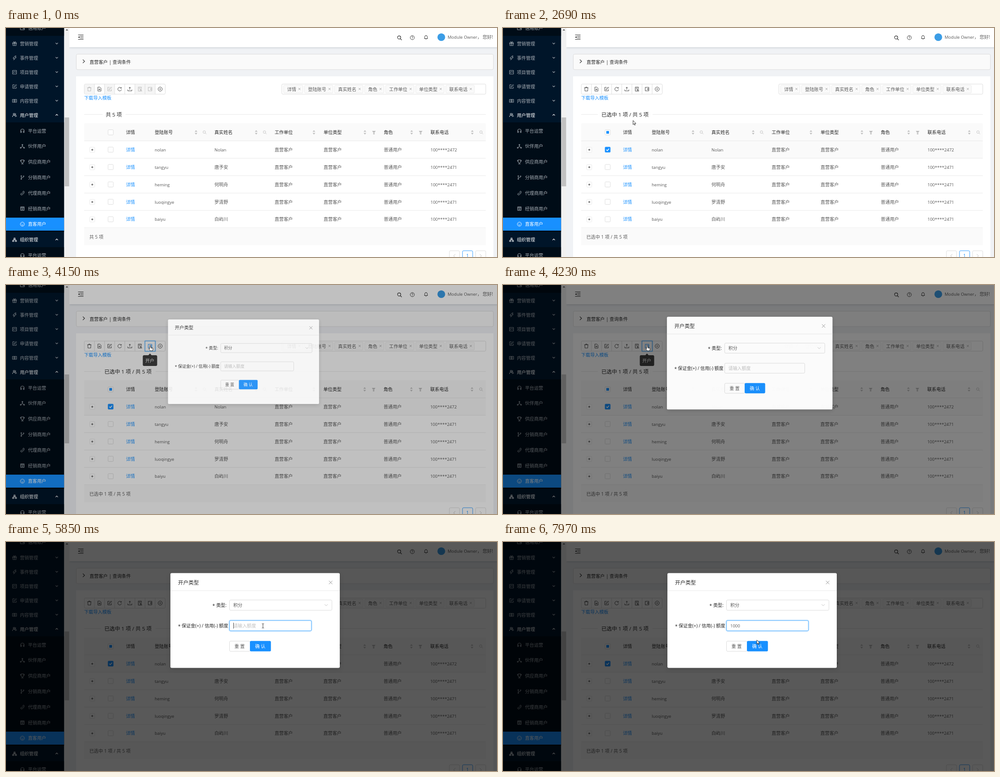
These frames come from a looping animation (1093 px wide and 512 px high, 8000 ms). An HTML page:

```html
<!DOCTYPE html>
<html lang="zh-CN">
<head>
<meta charset="utf-8">
<title>开户</title>
<style>
html, body { margin: 0; width: 100%; height: 100%; overflow: hidden; background: #f0f2f5; }
svg { display: block; width: 100vw; height: 100vh; }
text { font: 10.15px "Open Sans", "Noto Sans CJK SC", "Noto Sans CJK JP", sans-serif; white-space: pre; }
text.latin { font-size: 9.5px; }
text.big { font-size: 11.6px; }
.top { filter: drop-shadow(0 1px 2px rgba(0, 21, 41, .18)); }
.pop { filter: drop-shadow(0 3px 5px rgba(0, 0, 0, .15)); }
</style>
</head>
<body>
<svg id="stage" viewBox="0 0 1093 512"></svg>
<script>
const LOOP = 8000, BLUE = '#1890ff', TEXT = '#595959', HEAD = '#262626', LINE = '#e8e8e8', EDGE = '#d9d9d9';
const ring = (x, y, r) => `M${x - r} ${y}a${r} ${r} 0 1 0 ${2 * r} 0a${r} ${r} 0 1 0 ${-2 * r} 0`;
const icons = {
  card: 'M-4.5-3.5h9v7h-9zM4.5-1h-3v2h3',
  gift: 'M-4.5-2h9v2h-9zM-3.7 0v4.3h7.4V0M0-2v6M0-2c-3 0-3-3-1.5-2.5S0-2 0-2s.5-3 2-2.5S3-2 0-2',
  bolt: 'M1-4.5L-3.5.7h3L-2 4.5 4-1.3H1L3.5-4.5z',
  board: 'M-4.5-4h9v8h-9zM-2.2-2v4M0-2v2M2.2-2v3',
  edit: 'M0-4h-4v8h8V.5M-1.5 1.5l.3-1.8 4.7-4.2 1.2 1.2L.3 1.2z',
  read: 'M0-3.2h-4.7v6.5H0zM0-3.2h4.7v6.5H0zM-3.2-1h1.7M-3.2 1h1.7M1.5-1h1.7M1.5 1h1.7',
  team: ring(-1.2, -2.2, 1.8) + 'M-4.5 4c0-5.2 6.5-5.2 6.5 0M1.5-4a1.9 1.9 0 0 1 0 3.5c2 .6 2.6 2 2.9 3.8',
  headset: 'M-4 1V0a4 4 0 0 1 8 0v1M-4 .5h2V4h-2zM2 .5h2V4h-2z',
  nodes: 'M-1-4.3h2v2h-2zM-4.7 2.2h2v2h-2zM2.7 2.2h2v2h-2zM0-2.3V.5l-3 1.7M0 .5l3 1.7',
  cup: 'M-2.8-4.5h5.6v4a2.8 2.8 0 0 1-5.6 0zM-2.8-3.5h-1.7V-2l1.7 1.5M2.8-3.5h1.7V-2L2.8-.5M0 2.5v2M-2.5 4.5h5',
  branch: ring(-2.5, -3.3, 1) + ring(-2.5, 3.5, 1) + ring(2.7, -2.7, 1) + 'M-2.5-2.3v4.8M2.7-1.7c0 2.5-4.2 1-5.2 3.6',
  phone: 'M-4 2l2-1.8L-.7 1.3 2-1.4.7-2.7 2.3-4.5l2 1.6C4 .8.2 4.6-2.8 4.3z',
  shop: 'M-4-4h8v8h-8zM-4-1.3h8M-1.4-4v2.7M1.4-4v2.7M-1.5 4V1.2h3V4',
  smile: ring(0, 0, 4.6) + 'M-1.8-1.5v1M1.8-1.5v1M-2 1.2q2 2.4 4 0',
  org: 'M-1.5-4h3v2.5h-3zM-4.5 1.5h3V4h-3zM1.5 1.5h3V4h-3zM0-1.5V0M-3 1.5V0h6v1.5',
  bin: 'M-4.5-3h9M-1.5-3v-1.5h3V-3M-3.5-3l.4 7.3h6.2L3.5-3',
  fileAdd: 'M-3.5-4.5H1L3.5-2v6.5h-7zM0-1.2v4M-2 .8h4',
  reload: 'M3.4-2.2a4.1 4.1 0 1 0 .6 3M3.8-4.2v2.3H1.5',
  upload: 'M0 1.5v-6M-2-2.5l2-2 2 2M-4.5 1v3h9V1',
  audit: 'M3.3-1v-3.5h-7v9H-.5M-2-2.5h3.5M-2-.3H0' + ring(2, 1, 1.2) + 'M-.3 4.5c.3-2.6 4.3-2.6 4.6 0z',
  account: 'M-4-4h8v8h-8zM4-1.2H1v2.4h3',
  cancel: ring(0, 0, 4.6) + 'M-1.6-1.6l3.2 3.2M1.6-1.6l-3.2 3.2',
  search: ring(-.8, -.8, 3.5) + 'M1.8 1.8L5 5',
  help: ring(0, 0, 4.6) + 'M-1.4-1.2c0-2 2.9-1.8 2.8 0C1.4 0 0 0 0 1.2M0 2v.8',
  bell: 'M-4 3h8M-3 3v-3.5a3 3 0 0 1 6 0V3M0-3.5v-1M-1 4.5h2',
  fold: 'M-6-5H6M-1.5-1.7H6M-1.5 1.7H6M-6 5H6',
  down: 'M-2.6-1.3L0 1.3l2.6-2.6', up: 'M-2.6 1.3L0-1.3l2.6 2.6',
  next: 'M-2-3.8L2 0l-4 3.8', prev: 'M2-3.8L-2 0l4 3.8',
  cross: 'M-2.2-2.2l4.4 4.4M2.2-2.2l-4.4 4.4', plus: 'M-2.3 0h4.6M0-2.3v4.6'
};

function add(parent, tag, attrs = {}, content) {
  const node = document.createElementNS('http://www.w3.org/2000/svg', tag);
  set(node, attrs);
  if (content) node.textContent = content;
  return parent.appendChild(node);
}
function set(node, attrs) { for (const k in attrs) node.setAttribute(k, attrs[k]); }
const group = (p, a) => add(p, 'g', a);
const rect = (p, x, y, w, h, fill, a) => add(p, 'rect', { x, y, width: w, height: h, fill, ...a });
const box = (p, x, y, w, h, fill = '#fff', stroke = EDGE, rx = 2.5) => rect(p, x, y, w, h, fill, { stroke, rx, 'stroke-width': .9 });
const label = (p, x, cy, str, fill = TEXT, cls = '') => add(p, 'text', { x, y: cy + (cls == 'big' ? 4.3 : 3.8), fill, class: cls }, str);
const rule = (p, x1, x2, y, stroke = LINE) => add(p, 'line', { x1, x2, y1: y, y2: y, stroke });
const icon = (p, name, x, y, stroke = TEXT, a) => add(p, 'path',
  { d: icons[name], transform: `translate(${x} ${y})`, fill: 'none', stroke, 'stroke-width': .95, ...a });

const stage = document.getElementById('stage');
const page = group(stage);
rect(page, 0, 0, 1093, 512, '#f0f2f5');

// Header
rect(page, 141, -10, 960, 53, '#fff', { class: 'top' });
icon(page, 'fold', 166.5, 20.5, HEAD, { 'stroke-width': 1.1 });
add(page, 'path', { d: 'M160.5 20.5l3.3-2.3v4.6z', fill: HEAD });
icon(page, 'search', 876, 22, '#333', { 'stroke-width': 1.2 });
icon(page, 'help', 904.5, 21.5, '#333');
icon(page, 'bell', 935, 20.5, '#333');
add(page, 'circle', { cx: 969, cy: 20.5, r: 8.6, fill: '#3b9de6' });
label(page, 983, 20.5, 'Module Owner', TEXT, 'latin');
label(page, 1049, 20.5, '，');
label(page, 1061, 20.5, '您好!');

// Side menu
rect(page, 0, 0, 129.5, 512, '#001529');
for (const [y, h] of [[0, 17.5], [211, 245], [490, 22]]) rect(page, 0, y, 129.5, h, '#000c17');
rect(page, 0, 424, 129.5, 29, BLUE);
const DIM = '#a6adb4';
function menuItem(name, str, y, color = DIM, arrow) {
  const sub = !arrow;
  icon(page, name, sub ? 36.5 : 19, y, color);
  label(page, sub ? 49 : 31, y, str, color);
  if (arrow) icon(page, arrow, 113, y - .5, color, { 'stroke-width': 1.2 });
}
menuItem('card', '信用账户', .5);
[['gift', '营销管理'], ['bolt', '事件管理'], ['board', '项目管理'], ['edit', '申请管理'], ['read', '内容管理']]
  .forEach(([name, str], i) => menuItem(name, str, 35 + i * 31.95, DIM, 'down'));
menuItem('team', '用户管理', 194.8, '#fff', 'up');
[['headset', '平台运营'], ['nodes', '伙伴用户'], ['cup', '供应商用户'], ['branch', '分销商用户'],
  ['phone', '代理商用户'], ['shop', '经销商用户'], ['smile', '直客用户']]
  .forEach(([name, str], i) => menuItem(name, str, 229.8 + i * 34.8, i == 6 ? '#fff' : DIM));
menuItem('org', '组织管理', 473.5, '#fff', 'up');
menuItem('headset', '平台运营', 508.3);
rect(page, 129.5, 0, 11.5, 512, '#f1f1f1');
rect(page, 130.5, 200, 10, 154, '#c1c1c1');
add(page, 'path', { d: 'M132.8 5.5h5.6l-2.8-3z', fill: '#505050' });

// Query panel and card
box(page, 156.5, 58.5, 928.5, 34.5, '#fafafa', EDGE, 3);
icon(page, 'next', 173, 74.5, HEAD, { 'stroke-width': 1.1 });
label(page, 186, 76, '直营客户 | 查询条件', HEAD);
rect(page, 156, 108, 929, 404, '#fff');

// Toolbar
box(page, 174.3, 125.3, 180.2, 22.7);
const tools = ['bin', 'fileAdd', 'edit', 'reload', 'upload', 'audit', 'account', 'cancel'].map((name, i) => {
  const x = 174.3 + i * 22.53, locked = [0, 2, 5, 6].includes(i);
  const shade = locked && rect(page, x + .5, 125.8, 21.6, 21.7, '#f5f5f5');
  if (i) add(page, 'line', { x1: x, x2: x, y1: 125.3, y2: 148, stroke: EDGE, 'stroke-width': .9 });
  return { shade, pic: icon(page, name, x + 11.2, 136.6, '#000', { 'stroke-opacity': .75 }) };
});
const halo = rect(page, 308.8, 124.6, 24.2, 24.1, 'none', { stroke: BLUE, 'stroke-opacity': .2, 'stroke-width': 2.5, rx: 2 });
const hot = rect(page, 309.5, 125.3, 22.8, 22.7, 'none', { stroke: '#40a9ff' });
label(page, 174, 156, '下载导入模板', BLUE);

// Column tags
box(page, 614, 125.3, 454, 22.7);
[[618, '详情'], [664.5, '登陆账号'], [731.5, '真实姓名'], [798.5, '角色'], [845, '工作单位'], [912, '单位类型'], [979, '联系电话']]
  .forEach(([x, str]) => {
    const w = str.length > 2 ? 63.5 : 43;
    box(page, x, 128, w, 17.3, '#fafafa', LINE, 1.5);
    label(page, x + 7.8, 136.7, str);
    icon(page, 'cross', x + w - 7.8, 136.3, '#8c8c8c', { 'stroke-width': .8 });
  });

// Divider with the selection count
const ruleL = rule(page, 174, 215, 193.3), ruleR = rule(page, 266, 1068, 193.3);
const count = label(page, 222, 193.5, '共 5 项', HEAD, 'big');

// Table
const rowY = i => 272 + i * 38.9;
const rowFill = [0, 1, 2, 3, 4].map(i => rect(page, 174, rowY(i) - 19.5, 894, 38.9, '#fff'));
rect(page, 174, 213, 894, 39, '#fafafa', { rx: 2 });
for (let i = -1; i < 5; i++) rule(page, 174, 1068, rowY(i) + 19.2);
rect(page, 174, 447, 894, 38.5, '#fafafa');
const foot = label(page, 185.5, 467, '共 5 项');

const fixed = group(page), late = group(page);
const people = [['nolan', 'Nolan'], ['tangyu', '唐予安'], ['heming', '何明舟'], ['luoqingye', '罗清野'], ['baiyu', '白屿川']];
const columns = [
  [267, '详情', () => '详情'],
  [331, '登陆账号', i => people[i][0], 423, 'search', 442],
  [464, '真实姓名', i => people[i][1], 557, 'search', 576],
  [598, '工作单位', () => '直营客户', 685.5],
  [707, '单位类型', () => '直营客户', 799, 'filter', 819],
  [841, '角色', () => '普通用户', 903, 'filter', 923],
  [945, '联系电话', i => '100****' + (i ? 2471 : 2472), 1038, 'search', 1058]
];
columns.forEach(([x, title, cell, sortX, extra, extraX], c) => {
  const g = c > 3 ? late : fixed;
  label(g, x, 233.3, title, HEAD);
  if (sortX) add(g, 'path', { d: `M${sortX - 3} 232h6l-3-3.6zM${sortX - 3} 234.6h6l-3 3.6z`, fill: '#bfbfbf' });
  if (extra == 'search') icon(g, 'search', extraX, 233.3, '#b0b0b0', { transform: `translate(${extraX} 233.3) scale(.8)` });
  if (extra == 'filter') add(g, 'path', { d: `M${extraX - 4} 230h8l-2.6 4h-2.8zM${extraX - 1.6} 234.8h3.2v3h-3.2z`, fill: '#bfbfbf' });
  for (let i = 0; i < 5; i++) {
    const str = cell(i);
    label(g, x, rowY(i), str, c ? TEXT : BLUE, /^[\w*]+$/.test(str) ? 'latin' : '');
  }
});
const checkbox = y => box(page, 227.2, y - 5.8, 11.6, 11.6, '#fff', EDGE, 1.5);
checkbox(233.3);
const partial = rect(page, 230, 230.3, 6, 6, BLUE);
let firstCheck;
for (let i = 0; i < 5; i++) {
  const y = rowY(i), c = checkbox(y);
  if (!i) firstCheck = c;
  box(page, 186.4, y - 5.5, 11.2, 11.6, '#fff', LINE, 1.5);
  icon(page, 'plus', 192, y + .3, HEAD, { 'stroke-width': .9 });
}
const tick = add(page, 'path', { d: 'M230 272l2.2 2.3 3.9-4.5', fill: 'none', stroke: '#fff', 'stroke-width': 1.5 });

// Pagination
[987, 1016.2, 1045.3].forEach((x, i) => box(page, x, 498, 22.7, 22.7, '#fff', i == 1 ? BLUE : EDGE));
icon(page, 'prev', 998.3, 509.5, '#bfbfbf');
label(page, 1024.6, 509, '1', BLUE);
icon(page, 'next', 1056.6, 509.5, '#bfbfbf');

// Tooltip
const tip = group(stage);
add(tip, 'path', { d: 'M307.5 157h9.5l3.5-4 3.5 4h9.5q3 0 3 3v18q0 3-3 3h-26q-3 0-3-3v-18q0-3 3-3z', fill: '#000', 'fill-opacity': .75 });
label(tip, 310, 169, '开户', '#fff');

// Dialog
const mask = rect(stage, 0, 0, 1093, 512, '#000');
const modal = group(stage);
rect(modal, 366, 69.5, 377, 212, '#fff', { rx: 3, class: 'pop' });
label(modal, 383, 90.3, '开户类型', HEAD, 'big');
icon(modal, 'cross', 722.7, 90.5, '#8c8c8c', { d: 'M-3.8-3.8l7.6 7.6M3.8-3.8l-7.6 7.6' });
rule(modal, 366, 743, 108.8);
label(modal, 459.5, 142, '*', HEAD);
label(modal, 468, 141.3, '类型:', HEAD);
box(modal, 497.5, 129.7, 228, 23);
label(modal, 506, 141.3, '积分');
icon(modal, 'down', 712.7, 141, '#bfbfbf', { d: 'M-3.4-1.8L0 1.8l3.4-3.6' });
label(modal, 383, 188, '*', HEAD);
label(modal, 391, 187.3, '保证金(+) / 信用(-) 额度', HEAD);
const glow = rect(modal, 496.6, 174.8, 184, 24.6, 'none', { stroke: BLUE, 'stroke-width': 2, rx: 3.5 });
const input = box(modal, 497.5, 175.7, 182.3, 22.8);
const hint = label(modal, 506, 187.3, '请输入额度', '#bfbfbf');
const typed = label(modal, 506, 187.3, '', TEXT, 'latin');
const caret = rect(modal, 506, 180.5, .9, 13, '#333');
box(modal, 497.5, 221.6, 46, 22.8);
label(modal, 508.5, 233, '重 置');
rect(modal, 543, 221.2, 46.7, 23.4, BLUE, { rx: 2.5 });
set(label(modal, 554.5, 233, '确 认', '#fff'), { 'font-weight': 500 });

// Pointer shapes
const pointer = group(stage);
const shape = (d, a) => add(pointer, 'path', { d, fill: '#fff', stroke: '#222', 'stroke-width': .9, 'stroke-linejoin': 'round', ...a });
const shapes = {
  arrow: shape('M0 0v9.2l2.1-2 1.5 3.3 1.4-.6-1.5-3.2h3z'),
  hand: shape('M0 1a1 1 0 0 1 2 0v3.8l4 .9q1.4.3 1.2 1.8L6.4 12H1.3l-3.6-4.6q.4-1.5 2.3.2zM3.5 5v2M5.2 5.4v1.8'),
  beam: shape('M-2.2-5q2.2 0 2.2 1.2v7.6Q0 5-2.2 5M2.2-5Q0-5 0-3.8M2.2 5Q0 5 0 3.8', { fill: 'none' })
};
const path = [[830, 425, 463], [1610, 262, 276], [1850, 233, 271], [2420, 233, 271], [2690, 291, 205], [3080, 320, 135],
  [4380, 320, 135], [4690, 445, 160], [5390, 572, 187.5], [7800, 572, 187.5], [7970, 565, 219]];
const looks = [[830, 'arrow'], [1830, 'hand'], [2450, 'arrow'], [3050, 'hand'], [4400, 'arrow'], [5240, 'beam'], [7880, 'arrow']];
const keys = [6490, 6630, 6800, 6970];

const clamp = v => Math.max(0, Math.min(1, v));
const ramp = (t, from, len) => clamp((t - from) / len);
const show = (node, on) => set(node, { visibility: on ? 'visible' : 'hidden' });
const fade = (node, v) => { set(node, { opacity: v }); show(node, v > 0); };
const bez = (s, a, b) => 3 * (1 - s) ** 2 * s * a + 3 * (1 - s) * s * s * b + s ** 3;
function easeOut(x) {
  let lo = 0, hi = 1;
  for (let i = 0; i < 20; i++) {
    const m = (lo + hi) / 2;
    if (bez(m, .08, .17) < x) lo = m; else hi = m;
  }
  return x >= 1 ? 1 : x <= 0 ? 0 : bez(lo, .82, 1);
}
function place(t) {
  let i = 0;
  while (i < path.length - 2 && t >= path[i + 1][0]) i++;
  const [t0, x0, y0] = path[i], [t1, x1, y1] = path[i + 1], k = ramp(t, t0, t1 - t0);
  return [x0 + (x1 - x0) * k, y0 + (y1 - y0) * k];
}

function draw(t) {
  const q = t < 830 ? 0 : t > 7000 ? t : 830 + Math.floor((t - 822) / 77.2) * 77.2;
  const [x, y] = place(q), picked = q >= 2230;

  show(pointer, t >= 830);
  set(pointer, { transform: `translate(${x} ${y})` });
  const look = looks.filter(l => q >= l[0]).pop();
  for (const k in shapes) set(shapes[k], { display: look && look[1] == k ? 'inline' : 'none' });

  rowFill.forEach((r, i) => {
    const over = q >= 830 && q < 4380 && Math.abs(y - rowY(i)) < 19.4;
    set(r, { fill: over || (picked && !i) ? '#fafafa' : '#fff' });
  });
  set(firstCheck, { fill: picked ? BLUE : '#fff', stroke: picked || (q > 1830 && q < 2300) ? BLUE : EDGE });
  show(tick, picked);
  show(partial, picked);
  const sum = picked ? '已选中 1 项 / 共 5 项' : '共 5 项';
  count.textContent = foot.textContent = sum;
  set(count, { x: picked ? 219 : 222 });
  set(ruleL, { x2: picked ? 211 : 215 });
  set(ruleR, { x1: picked ? 333 : 266 });

  const on = ramp(q, 2200, 300), hover = q >= 3080 && q < 4500;
  tools.forEach(({ shade, pic }, i) => {
    if (shade) {
      fade(shade, 1 - on);
      set(pic, { 'stroke-opacity': .25 + .5 * on });
    }
    if (i == 6) set(pic, hover ? { stroke: BLUE, 'stroke-opacity': 1 } : { stroke: '#000' });
  });
  show(hot, hover);
  show(halo, q >= 3930 && q < 4500);
  fade(tip, ramp(q, 3170, 200) * (1 - ramp(q, 4450, 150)));
  set(late, { transform: `translate(${q >= 3900 ? -.6 : 0} 0)` });

  const open = easeOut(ramp(q, 4073, 270)), s = .2 + .8 * open;
  fade(mask, .65 * ramp(q, 4073, 200));
  fade(modal, open);
  set(modal, { transform: `translate(316 139) scale(${s}) translate(-316 -139)` });

  const focus = ramp(q, 5620, 220), n = keys.filter(k => t >= k).length;
  set(glow, { 'stroke-opacity': .25 * focus });
  set(input, { stroke: q >= 5240 ? '#40a9ff' : EDGE });
  set(hint, { display: n ? 'none' : 'inline' });
  typed.textContent = '1000'.slice(0, n);
  set(caret, {
    x: 506 + n * 5.45,
    display: (t >= 5700 && t < 6250) || (t >= 6490 && t < 7500) ? 'inline' : 'none'
  });
}

const start = performance.now();
function tickFrame() {
  draw((performance.now() - start) % LOOP);
  requestAnimationFrame(tickFrame);
}
tickFrame();
</script>
</body>
</html>
```
